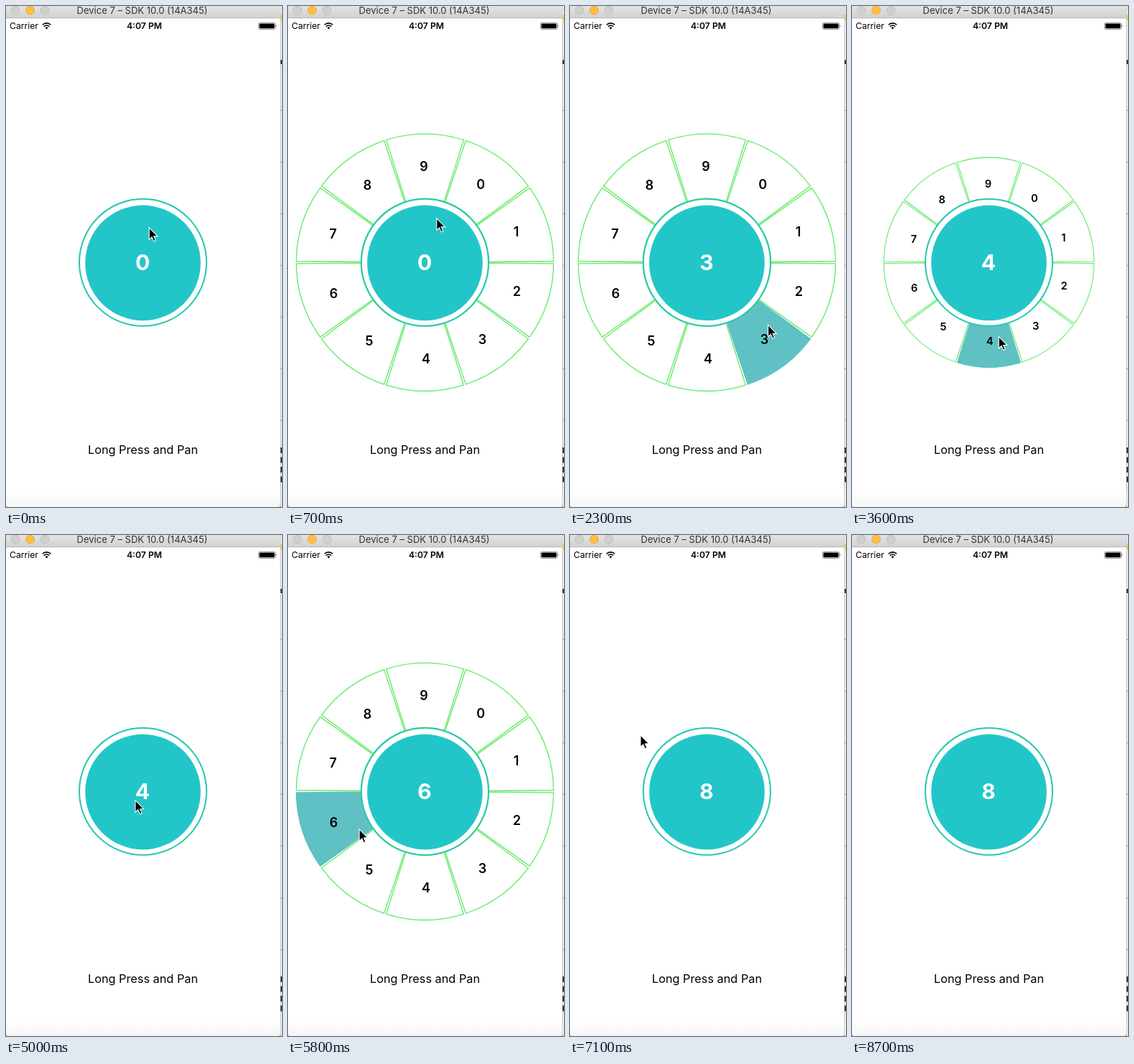
Recreate the animation shown at these times as an HTML page. Size 384 by 698 pixels, loop 9000 ms.

```html
<!DOCTYPE html>
<html lang="en">
<head>
<meta charset="utf-8">
<title>Dial</title>
<style>
html, body { margin: 0; width: 100%; height: 100%; overflow: hidden; background: #fff; }
svg { display: block; width: 384px; height: 698px; font-family: Inter, Roboto, sans-serif; }
.mid { text-anchor: middle; }
.digit { font-size: 18px; font-weight: 600; }
.sector { fill: #fff; stroke: #5fea62; stroke-width: 1.3; }
.sector.on { fill: #5fc1c3; stroke: #5fc1c3; }
</style>
</head>
<body>
<svg viewBox="0 0 384 698">
  <defs>
    <linearGradient id="bar" x2="0" y2="1">
      <stop stop-color="#e4e3e4"/><stop offset="1" stop-color="#d2d1d2"/>
    </linearGradient>
    <linearGradient id="foot" x2="0" y2="1">
      <stop stop-color="#fff"/><stop offset="1" stop-color="#f5f5f5"/>
    </linearGradient>
  </defs>

  <!-- window behind -->
  <rect width="384" height="698" fill="#f3f3f3"/>
  <rect x="381" width="1.5" height="698" fill="#b9b9b9"/>
  <rect x="382" y="12" width="2" height="8" fill="#f2c84b"/>
  <path d="M383 145V600" stroke="#999" stroke-width="2" stroke-dasharray="1 71"/>
  <path d="M383 615V664" stroke="#333" stroke-width="2" stroke-dasharray="8 5.5"/>
  <path d="M383 75v6" stroke="#333" stroke-width="2"/>

  <!-- simulator window -->
  <path d="M0 690h382v8H0z" fill="#aaa"/>
  <path d="M0 0H381.5V694q0 4-4 4H4q-4 0-4-4z" fill="#fff"/>
  <path d="M0 678H381.5V694q0 4-4 4H4q-4 0-4-4z" fill="url(#foot)"/>
  <rect width="382" height="17" fill="url(#bar)"/>
  <rect y="16.3" width="382" height=".9" fill="#b4b3b4"/>
  <g stroke-width=".8">
    <circle cx="13" cy="6" r="6" fill="#d0cfd0" stroke="#bdbcbd"/>
    <circle cx="33.5" cy="6" r="6" fill="#fdbf3f" stroke="#e0a433"/>
    <circle cx="54" cy="6" r="6" fill="#d0cfd0" stroke="#bdbcbd"/>
  </g>
  <text class="mid" x="189.5" y="11.3" font-size="13" fill="#333">Device 7 – SDK 10.0 (14A345)</text>

  <!-- status bar -->
  <text x="5" y="32" font-size="12.2">Carrier</text>
  <path d="M50.7 26.3a8.2 8.2 0 0 1 11.6 0M52.8 28.6a5.2 5.2 0 0 1 7.4 0" fill="none" stroke="#000" stroke-width="1.6"/>
  <path d="M56.5 32.4l-2-2.1a2.8 2.8 0 0 1 4 0z"/>
  <text class="mid" x="192.5" y="32" font-size="12.2" font-weight="600">4:07 PM</text>
  <rect x="351.3" y="23.3" width="23.4" height="9.2" rx="2" fill="#fff" stroke="#666" stroke-width=".7"/>
  <rect x="352.5" y="24.5" width="21" height="6.8" rx="1"/>
  <path d="M375.5 26q1.6 1.7 0 3.6z"/>

  <g id="wheel"></g>
  <g transform="translate(190.5 357.3)">
    <circle r="88.5" fill="#fff" stroke="#25c8ae" stroke-width="2"/>
    <circle r="80.3" cy=".6" fill="#23c6c8"/>
    <text id="value" class="mid" x="-.5" y="11" font-size="30" font-weight="700" fill="#fff"></text>
  </g>
  <text class="mid" x="190.5" y="624" font-size="16.3">Long Press and Pan</text>
  <path id="cursor" d="M1 0V16.5L4.8 13L7.4 19L10 17.9L7.5 12H12.8Z" stroke="#fff" stroke-width="1.1"/>
</svg>
<script>
const LOOP = 9000, STEP = 100, LAG = 60, INNER = 89, OUTER = 179, CX = 190.5, CY = 357.3;
const $ = id => document.getElementById(id);
const polar = (r, deg) => [r * Math.cos(deg * Math.PI / 180), r * Math.sin(deg * Math.PI / 180)];

// Each pan opens the wheel, sweeps it and lets it close again
const pans = [{ open: 400, close: 3490, digit: 0 }, { open: 5000, close: 6800, digit: 4 }];

// Cursor around the dial: time, angle, radius
const path = [
  [600, -81, 49], [900, -66, 92], [1500, -26, 107], [2300, 46, 121], [2700, 83, 104],
  [4200, 83, 104], [4400, 133, 17], [5200, 133, 17], [5500, 125, 100], [6600, 218, 123],
  [6700, 220, 122], [7900, 220, 122], [8200, 305, 350]
];

const clamp = p => Math.min(1, Math.max(0, p));
function ease(t, start) {
  const p = clamp((t - start) / 300);
  return p * p * (3 - 2 * p);
}

function cursorAt(t) {
  const i = Math.max(1, path.findIndex(k => k[0] > t));
  const [a, b] = t < path.at(-1)[0] ? [path[i - 1], path[i]] : path.slice(-2);
  const p = clamp((t - a[0]) / (b[0] - a[0]));
  return { deg: a[1] + (b[1] - a[1]) * p, r: a[2] + (b[2] - a[2]) * p };
}

function add(tag, attrs) {
  const el = document.createElementNS("http://www.w3.org/2000/svg", tag);
  for (const k in attrs) el.setAttribute(k, attrs[k]);
  return $("wheel").appendChild(el);
}

const sectors = [];
for (let d = 0; d < 10; d++) {
  const mid = -54 + 36 * d, from = mid - 17.5, to = mid + 17.5;
  sectors.push(add("path", {
    class: "sector",
    d: `M${polar(INNER, from)}L${polar(OUTER, from)}A${OUTER} ${OUTER} 0 0 1 ${polar(OUTER, to)}` +
       `L${polar(INNER, to)}A${INNER} ${INNER} 0 0 0 ${polar(INNER, from)}Z`
  }));
  const [x, y] = polar(134, mid - .6);
  add("text", { class: "digit mid", x, y: y + 6.5 }).textContent = d;
}

function draw(now) {
  const t = Math.floor(now % LOOP / STEP) * STEP;
  const pan = pans[t < 4100 ? 0 : 1];
  const scale = .4 + .6 * (ease(t, pan.open) - ease(t, pan.close));
  const touch = cursorAt(Math.min(t - LAG, pan.close - LAG));
  const over = touch.r > INNER;
  const digit = over ? Math.floor((touch.deg + 72) / 36) : pan.digit;
  const { r, deg } = cursorAt(t), [x, y] = polar(r, deg);

  $("wheel").setAttribute("transform", `translate(${CX} ${CY}) scale(${scale})`);
  sectors.forEach((s, d) => s.classList.toggle("on", over && t > pan.open && d === digit));
  $("value").textContent = digit;
  $("cursor").setAttribute("transform", `translate(${CX + x} ${CY + y})`);
}

const start = performance.now();
function frame() {
  draw(performance.now() - start);
  requestAnimationFrame(frame);
}
frame();
</script>
</body>
</html>
```
